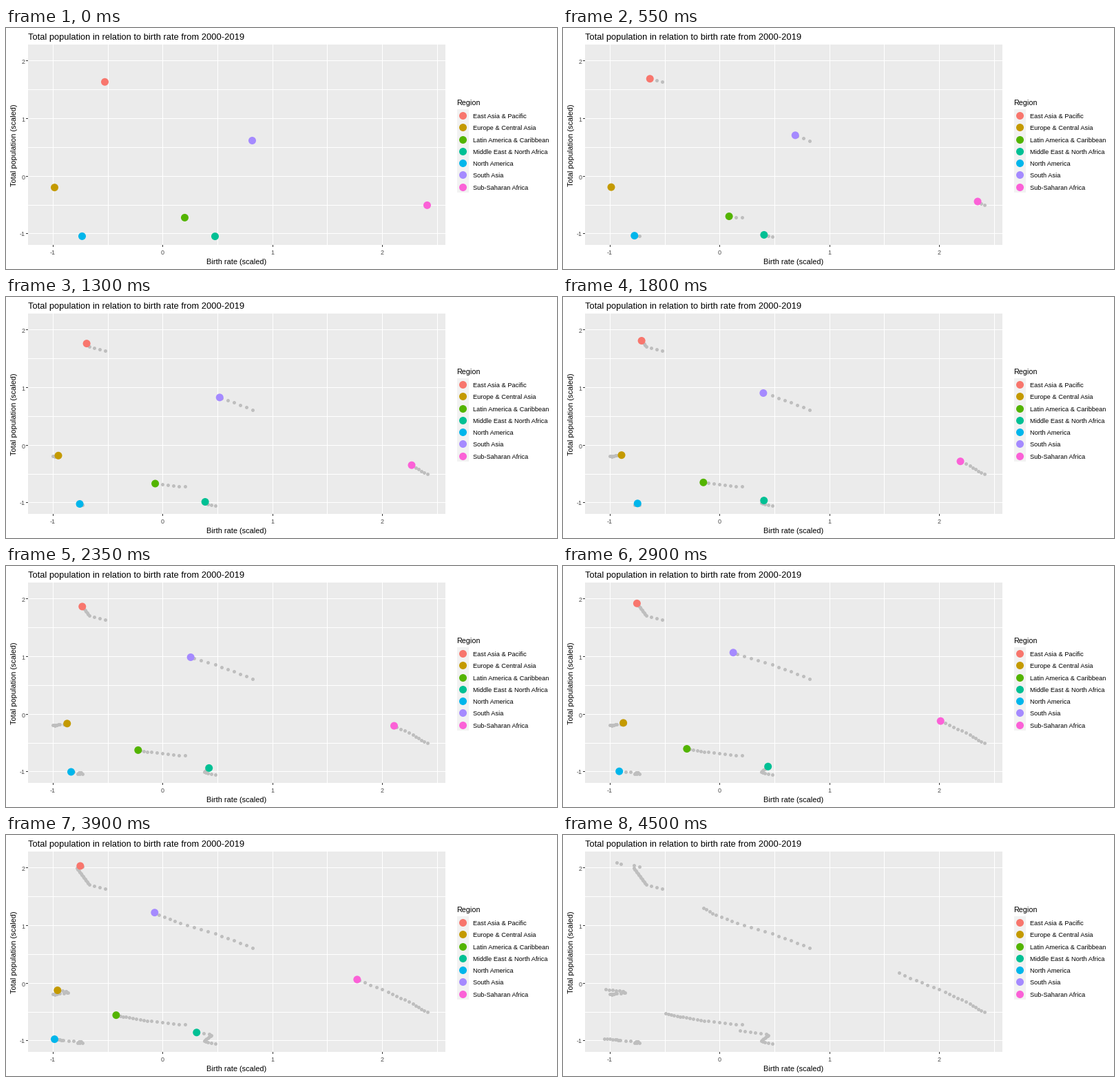
Animation, 800 px wide and 350 px high, one loop 5000 ms. Source, as a matplotlib script:

```python
import matplotlib.pyplot as plt
import numpy as np
from matplotlib.animation import FuncAnimation
from matplotlib.patches import Rectangle

WIDTH, HEIGHT, DPI = 800, 350, 100
PX = 72 / DPI  # points per pixel
FRAMES, INTERVAL, END = 100, 50, 90
YEARS = np.arange(20)

# name, colour, turning points (year: x), then y at the start, y at the end, bend
REGIONS = [
    ("East Asia & Pacific", "#F8766D",
     {0: 143.5, 3: 120.5, 15: 102.5, 16: 110.5, 17: 102.5, 18: 83.5, 19: 77.5},
     (78.3, 39.5, 0)),
    ("Europe & Central Asia", "#C49A00",
     {0: 70.5, 1: 67.5, 6: 77.5, 8: 89.5, 14: 86.5, 19: 61.5}, (231.6, 224, 4)),
    ("Latin America & Caribbean", "#53B400",
     {0: 259.5, 6: 210.5, 12: 178.5, 19: 148.5}, (275.4, 259.4, 0)),
    ("Middle East & North Africa", "#00C094",
     {0: 303.5, 2: 292.5, 4: 287.5, 12: 298, 14: 294.5, 19: 256.5},
     (302.6, 284.2, 0)),
    ("North America", "#00B6EB",
     {0: 110.5, 2: 103.5, 7: 109, 8: 106, 11: 83, 15: 76, 19: 59.5},
     (302.4, 295.6, 0)),
    ("South Asia", "#A58AFF",
     {0: 357.5, 6: 303.5, 11: 253, 15: 222, 19: 203.5}, (163.5, 105.5, -8)),
    ("Sub-Saharan Africa", "#FB61D7",
     {0: 611.5, 5: 590.5, 11: 554.5, 19: 487.5}, (257.4, 200.3, 13)),
]
COLORS = [region[1] for region in REGIONS]


def track(turns, start, end, bend):
    u = YEARS / YEARS[-1]
    x = np.interp(YEARS, list(turns), list(turns.values()))
    y = start + (end - start) * u + bend * u * (1 - u)
    return np.column_stack([x, y])


tracks = np.array([track(turns, *rise) for _, _, turns, rise in REGIONS])

# Each year is held for two frames; travel is shorter after year 13.
arrive = 5 * YEARS - 1 - np.maximum(0, YEARS - 13)
stops = np.column_stack([arrive, arrive + 1]).ravel()
held_years = np.repeat(YEARS, 2)

fig = plt.figure(figsize=(WIDTH / DPI, HEIGHT / DPI), dpi=DPI, facecolor="white")
ax = fig.add_axes([0, 0, 1, 1])
ax.set(xlim=(0, WIDTH), ylim=(HEIGHT, 0))
ax.axis("off")


def box(x, y, w, h, color):
    ax.add_patch(Rectangle((x, y), w, h, fc=color, lw=0, antialiased=False, zorder=0))


def label(x, y, text, size, color="black", **kw):
    ax.text(x, y, text, fontsize=size * PX, color=color,
            family="Liberation Sans", va="baseline", **kw)


def dots(points, diameter, color, zorder):
    x, y = np.reshape(points, (-1, 2)).T
    return ax.scatter(x, y, s=(diameter * PX) ** 2, c=color, linewidths=0,
                      snap=False, zorder=zorder)


def draw_panel():
    left, top, right, bottom = 32, 24, 638, 315
    box(left, top, right - left, bottom - top, "#EBEBEB")
    for value in np.arange(-1, 2.6, 0.5):
        major = value == int(value)
        x = int(227.8 + 159.3 * value)
        box(x, top, 1, bottom - top, "white")
        if major:
            box(x, bottom, 1, 3, "#333333")
            label(x, 329, f"{value:.0f}", 9, "#4D4D4D", ha="center")
        if value > 2:
            continue
        y = int(215.2 - 83.7 * value)
        box(left, y, right - left, 1, "white")
        if major:
            box(left - 3, y, 3, 1, "#333333")
            label(27.5, y + 4.5, f"{value:.0f}", 9, "#4D4D4D", ha="right")
    label(31.5, 17, "Total population in relation to birth rate from 2000-2019", 12.9)
    label(334.7, 343, "Birth rate (scaled)", 11, ha="center")
    label(15, 170.5, "Total population (scaled)", 11, ha="center",
          rotation=90, rotation_mode="anchor")


def draw_legend():
    label(654.5, 112, "Region", 10.7)
    box(655, 118, 17, 121, "#F2F2F2")
    for i, (name, color, *_) in enumerate(REGIONS):
        y = 127 + 17.28 * i
        dots([663.2, y], 11, color, 2)
        label(678, y + 4, name, 9.3)


draw_panel()
draw_legend()
trail = dots(tracks[:, :1], 5, "#BEBEBE", 3)
heads = dots(tracks[:, 0], 11, COLORS, 4)


def update(frame):
    year = np.interp(frame, stops, held_years)
    now = int(year + 1e-9)
    after = min(now + 1, YEARS[-1])
    a, b = tracks[:, now], tracks[:, after]
    heads.set_offsets(a + (b - a) * (year - now))
    heads.set_visible(frame < END)
    trail.set_offsets(tracks[:, :now + 1].reshape(-1, 2))
    return trail, heads


anim = FuncAnimation(fig, update, frames=FRAMES, interval=INTERVAL,
                     repeat=True, repeat_delay=0, blit=False)
plt.show()
```
